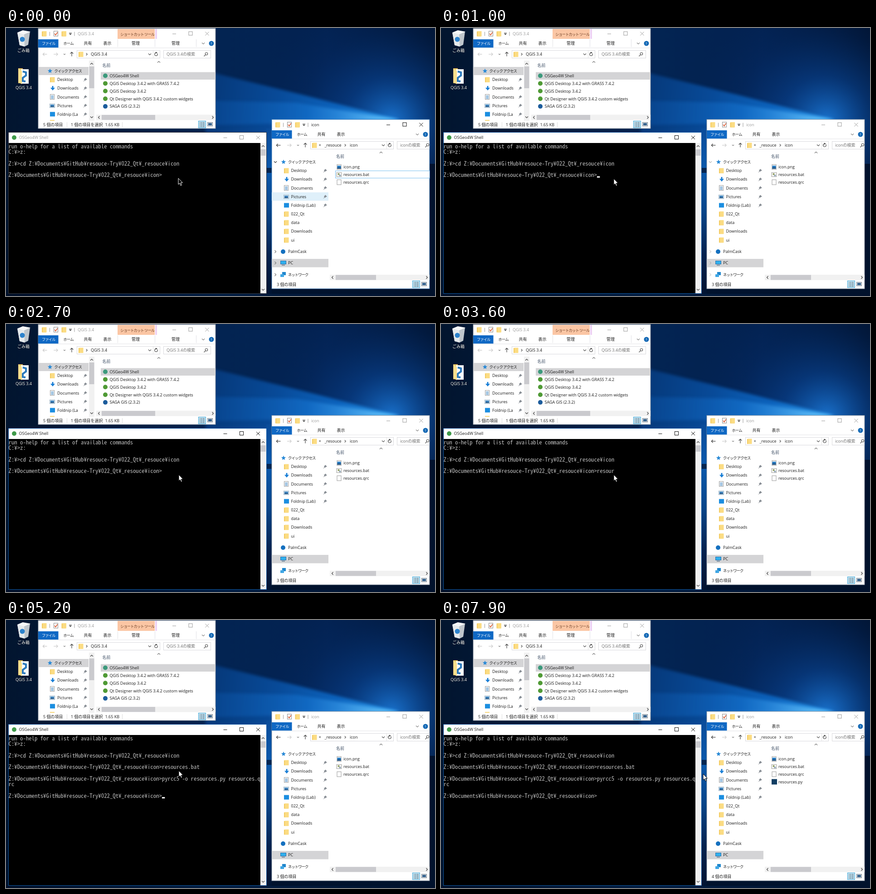
An HTML page with a canvas for the animation above (8 s loop, 946 px wide and 592 px high).

```html
<!DOCTYPE html>
<html lang="ja">
<head>
<meta charset="utf-8">
<title>Shell and folders</title>
<style>
html, body { margin: 0; width: 100%; height: 100%; overflow: hidden; background: #021330; }
canvas { display: block; }
</style>
</head>
<body>
<canvas id="stage" width="946" height="592"></canvas>
<script>
const W = 946, H = 592, LOOP = 8000;
const ctx = document.getElementById('stage').getContext('2d');
const UI = '"Open Sans", "Noto Sans CJK JP", "Noto Sans CJK", sans-serif';
const MONO = '"Noto Sans Mono CJK JP", "Liberation Mono", monospace';
const BLUE = '#0f68c4', GREY = '#9a9a9a', INK = '#1c1c1c', SEL = '#d4d4d6', THUMB = '#cacace';

// ---------- basic shapes ----------
function rect(x, y, w, h, fill) {
  ctx.fillStyle = fill;
  ctx.fillRect(x, y, w, h);
}
function box(x, y, w, h, color, fill) {
  if (fill) rect(x, y, w, h, fill);
  ctx.strokeStyle = color;
  ctx.lineWidth = 1;
  ctx.strokeRect(x + .5, y + .5, w - 1, h - 1);
}
function disc(x, y, r, fill) {
  ctx.fillStyle = fill;
  ctx.beginPath();
  ctx.arc(x, y, r, 0, Math.PI * 2);
  ctx.fill();
}
function trace(pts) {
  ctx.beginPath();
  for (let i = 0; i < pts.length; i += 2) ctx.lineTo(pts[i], pts[i + 1]);
}
function line(color, width, ...pts) {
  trace(pts);
  ctx.strokeStyle = color;
  ctx.lineWidth = width;
  ctx.stroke();
}
function poly(fill, ...pts) {
  trace(pts);
  ctx.closePath();
  ctx.fillStyle = fill;
  ctx.fill();
}
function addStops(g, colors) {
  colors.forEach((c, i) => g.addColorStop(i / (colors.length - 1), c));
  return g;
}
const shade = (x0, y0, x1, y1, ...colors) =>
  addStops(ctx.createLinearGradient(x0, y0, x1, y1), colors);
const glow = (x, y, r, ...colors) =>
  addStops(ctx.createRadialGradient(x, y, 0, x, y, r), colors);

// ---------- text, y is the middle of the line ----------
function text(s, x, y, color = INK, size = 9, space = 0) {
  ctx.font = size + 'px ' + UI;
  ctx.letterSpacing = space + 'px';
  ctx.fillStyle = color;
  ctx.fillText(s, x, y + 3.3);
  ctx.letterSpacing = '0px';
}
const kana = (s, x, y, color) => text(s, x, y, color, 8.3, -.9);

// ---------- icons, x and y are the centre ----------
function folder(x, y) {
  rect(x - 5, y - 5, 9, 11, '#f3cb62');
  rect(x - 3, y - 5.5, 8.5, 11.5, '#fbdc83');
}
function checkDoc(x, y) {
  box(x - 5, y - 6, 10, 12, '#8a8a8a', '#fff');
  line('#d9542b', 1.5, x - 3, y, x - .5, y + 3, x + 3.5, y - 3);
}
function down(x, y) {
  rect(x - .5, y - 5, 3, 5, '#1a7fd6');
  poly('#1a7fd6', x - 4, y - 1, x + 6, y - 1, x + 1, y + 5);
}
function paper(x, y) {
  box(x - 5, y - 6, 10, 12, '#9a9a9a', '#fff');
}
function sheet(x, y) {
  paper(x, y);
  for (let i = -3; i < 5; i += 2) rect(x - 3, y + i, 6, 1, '#4d8fc6');
}
function picture(x, y) {
  box(x - 6, y - 4, 12, 9, '#8fa9bd', '#e9f4fb');
  rect(x - 4, y - 2, 8, 5, '#3b84c0');
  rect(x - 4, y + 1, 8, 2, '#1d4d7c');
}
function picturePage(x, y) {
  paper(x, y);
  rect(x - 4, y - 3, 8, 7, '#2c7fc4');
  rect(x - 4, y + 1, 8, 3, '#1c4f80');
}
function star(x, y) {
  const pts = [];
  for (let i = 0; i < 10; i++) {
    const a = i * Math.PI / 5 - Math.PI / 2, r = i % 2 ? 2.4 : 5.4;
    pts.push(x + r * Math.cos(a), y + r * Math.sin(a));
  }
  poly('#2a8ad6', ...pts);
}
function pin(x, y) {
  poly('#858b92', x, y - 4, x + 4, y, x + 1, y + 1, x - 1, y + 3, x - 3, y - 1, x - 1, y - 2);
  line('#858b92', 1, x - 4, y + 4, x - 1, y + 1);
}
function monitor(x, y) {
  rect(x - 6, y - 5, 13, 8, '#2f6fa8');
  rect(x - 5, y - 4, 11, 6, '#2fb0ee');
  rect(x - 3, y + 4, 7, 1.5, '#56748e');
}
function network(x, y) {
  rect(x - 2, y - 6, 8, 7, '#1f86cd');
  rect(x - 6, y - 1, 8, 6, '#3fa6e4');
}
function gears(x, y) {
  box(x - 6, y - 5, 12, 10, '#a0a0a0', '#f7f7f4');
  disc(x - 1, y - 1, 2, '#8c9a5a');
  disc(x + 2, y + 2, 2, '#8da3b5');
}
const greenDot = (x, y) => disc(x, y, 5, '#4f9a35');
const blueDot = (x, y) => disc(x, y, 5, '#1c5c9c');
const tealDot = (x, y) => disc(x, y, 5, '#3c9a7c');
const cyanBox = (x, y) => rect(x - 5, y - 5, 11, 10, '#1b8ee0');
const skyDot = (x, y) => disc(x, y, 5, '#1470bf');
const navyBox = (x, y) => rect(x - 5.5, y - 6, 12, 12, '#123e63');

// Chevron pointing along (dx, dy)
function chev(x, y, dx, dy, color = '#555', r = 3) {
  const px = -dy * r, py = dx * r, ax = dx * r / 2, ay = dy * r / 2;
  line(color, 1.1, x - ax + px, y - ay + py, x + ax, y + ay, x - ax - px, y - ay - py);
}
function arrow(x, y, dx, dy, color) {
  line(color, 1.1, x - dx * 4.5, y - dy * 4.5, x + dx * 4.5, y + dy * 4.5);
  chev(x + dx * 3, y + dy * 3, dx, dy, color, 3.4);
}
function refresh(x, y) {
  ctx.beginPath();
  ctx.arc(x, y, 3.3, -.6, 4.4);
  ctx.strokeStyle = '#444';
  ctx.lineWidth = 1.1;
  ctx.stroke();
  poly('#444', x - 1, y - 5.5, x + 3, y - 3.5, x - 1, y - 1.5);
}
function lens(x, y) {
  ctx.beginPath();
  ctx.arc(x + 1, y - 1, 2.7, 0, 7);
  ctx.strokeStyle = '#555';
  ctx.lineWidth = 1.1;
  ctx.stroke();
  line('#555', 1.3, x - 1, y + 1, x - 4.5, y + 4.5);
}
function controls(right, y, color) {
  const [a, b, c] = [right - 91, right - 55, right - 18.5];
  line(color, 1, a - 4, y + .5, a + 4, y + .5);
  ctx.strokeRect(b - 4, y - 4.5, 8, 8);
  line(color, 1, c - 4, y - 4, c + 4, y + 4);
  line(color, 1, c - 4, y + 4, c + 4, y - 4);
}
function viewIcons(x, y) {
  box(x, y, 17, 16, '#3fa5d4', '#cbe8f6');
  for (let r = 0; r < 4; r++) {
    rect(x + 3, y + 3 + r * 3, 2, 1.5, '#5d7d8e');
    rect(x + 6, y + 3 + r * 3, 3, 1.5, '#5d7d8e');
    rect(x + 10, y + 3 + r * 3, 4, 1.5, '#5d7d8e');
  }
  box(x + 20, y + 3, 12, 9, '#6e7a84', '#f4f6f8');
  rect(x + 22, y + 5, 8, 5, '#34618c');
}
function hScroll(x0, x1, y, thumb, width) {
  rect(x0, y, x1 - x0, 12, '#f1f1f1');
  rect(thumb, y + .5, width, 11, THUMB);
  chev(x0 + 6, y + 6, -1, 0, '#444');
  chev(x1 - 6, y + 6, 1, 0, '#444');
}
function vScroll(x, y0, y1, thumb, height) {
  rect(x, y0, 12, y1 - y0, '#f1f1f1');
  rect(x + .5, thumb, 11, height, THUMB);
  chev(x + 6, y0 + 7, 0, -1, '#444');
  chev(x + 6, y1 - 8, 0, 1, '#444');
}

// ---------- desktop ----------
function wallpaper() {
  rect(0, 0, W, H, shade(0, 0, W, 0, '#02152f', '#021a3c', '#032452', '#032150', '#01112c'));
  rect(0, 230, W, 362, shade(0, 230, 0, 592, 'rgba(1,18,44,0)', '#01122c'));
  rect(460, 0, 486, 300, glow(850, 205, 300, 'rgba(30,130,230,.85)', 'rgba(12,85,180,.45)', 'rgba(6,55,125,.2)', 'rgba(4,40,95,0)'));
  ctx.filter = 'blur(3px)';
  poly(shade(865, 198, 462, 150, '#2f9ff2', '#0c63bd', '#084a98', '#063a7c'),
    868, 203, 660, 149, 440, 95, 440, 240, 600, 240);
  poly(shade(865, 198, 462, 190, 'rgba(120,210,255,.9)', 'rgba(25,125,220,.45)', 'rgba(14,95,185,.3)'),
    868, 203, 640, 165, 440, 160, 440, 215, 640, 210);
  ctx.filter = 'none';
  rect(574, 222, 12, 370, shade(0, 222, 0, 592, '#0a4c9a', '#0b59ac', '#084488', '#04224f', '#011330'));
  rect(574, 309, 12, 11, '#04254f');
  rect(0, 587, W, 5, shade(0, 0, W, 0, '#010f28', '#021d42', '#01112c'));
}
function label(s, x, y) {
  ctx.textAlign = 'center';
  ctx.shadowColor = '#000';
  ctx.shadowBlur = 2;
  text(s, x, y, '#fff');
  ctx.shadowBlur = 0;
  ctx.textAlign = 'left';
}
function desktopIcons() {
  poly('#bfc6cc', 25, 10, 53, 8, 49, 37, 41, 41, 30, 38);
  poly('#e6eaec', 25, 10, 40, 13, 41, 41, 30, 38);
  poly('#f6f8f9', 25, 10, 37, 5, 54, 8, 40, 14);
  disc(36, 25, 5.5, '#2c82cc');
  label('ごみ箱', 38.5, 50);
  rect(27, 89, 10, 33, '#f0c75c');
  rect(33, 91, 17, 32, '#f8fafb');
  line('#2b79bd', 4, 37, 96, 44, 98, 44, 105, 37, 110, 37, 117, 43, 118);
  poly('#fbdf8c', 27, 89, 35, 95, 35, 124, 27, 120);
  label('QGIS 3.4', 39, 132);
}

// ---------- folder windows ----------
function frame(x, y, w, h, title, active) {
  rect(x, y, w, h, '#fff');
  box(x - .5, y - .5, w + 1, h + 1, active ? '#3c78b4' : '#8a93a0');
  const m = y + 11.5;
  folder(x + 13, m);
  checkDoc(x + 39, m);
  folder(x + 56.5, m);
  rect(x + 25, m - 4, 1, 9, '#999');
  rect(x + 79.5, m - 4, 1, 9, '#999');
  poly('#444', x + 68, m, x + 74, m, x + 71, m + 3);
  rect(x + 68, m - 2, 6, 1, '#444');
  text(title, x + 87, m, active ? INK : GREY);
  controls(x + w, m, active ? '#111' : GREY);

  const tab = y + 33;
  rect(x, y + 24, 44.5, 18.5, BLUE);
  kana('ファイル', x + 8, tab, '#fff');
  kana('ホーム', x + 55.5, tab);
  text('共有', x + 100.5, tab);
  text('表示', x + 143.5, tab);
  rect(x, y + 42.5, w, 1, '#e2e2e6');
  chev(x + w - 27, tab, 0, 1, '#888');
  disc(x + w - 9, tab, 5.5, '#1268b5');
  text('?', x + w - 11, tab, '#fff', 8);
}
function addressBar(x, y, backOn) {
  arrow(x + 15, y, -1, 0, backOn ? '#333' : '#c4c4c4');
  arrow(x + 38.5, y, 1, 0, '#c8c8c8');
  chev(x + 58, y, 0, 1, '#888', 2);
  arrow(x + 74, y, 0, -1, '#333');
  box(x + 85, y - 9, 184, 18, '#d9d9dd', '#fff');
  folder(x + 94, y);
  chev(x + 246, y, 0, 1);
  rect(x + 253, y - 8, 1, 16, '#e2e2e2');
  refresh(x + 260, y);
}
function rows(list, x, textX, y, step) {
  list.forEach(([icon, s], i) => {
    icon(x, y + i * step);
    text(s, textX, y + i * step);
  });
}
const PLACES = [[folder, 'Desktop'], [down, 'Downloads'], [sheet, 'Documents'], [picture, 'Pictures']];

function programsWindow() {
  frame(71, 1, 391, 221, 'QGIS 3.4', false);
  rect(246, 2, 82, 22, '#fbc6a4');
  rect(329, 2, 4, 22, '#eed2f4');
  kana('ショートカット ツール', 252, 14, '#6b3d24');
  for (const x of [246, 328, 419]) rect(x, 25, 1, 17, '#e2e2e6');
  text('管理', 277, 34);
  text('管理', 365, 34);
  addressBar(71, 58, false);
  chev(178, 58, 1, 0, '#555', 2.5);
  text('QGIS 3.4', 187, 58);
  box(347, 49, 105, 18, '#d9d9dd', '#fff');
  text('QGIS 3.4の検索', 354, 58, '#707070');
  lens(441, 58);

  rect(71, 86, 111, 18, SEL);
  star(97, 95);
  kana('クイック アクセス', 106.5, 95);
  rows([...PLACES, [cyanBox, 'Foldnip (La']], 102, 113, 114, 19.1);
  for (let i = 0; i < 5; i++) pin(175, 114 + i * 19.1);
  rect(97, 203, 10, 2, '#f7d77c');
  vScroll(183, 72, 205, 85, 48);

  text('名前', 212.5, 83, '#44546a');
  chev(337, 75, 0, -1, '#777');
  rect(209, 97.5, 253, 16.5, SEL);
  rows([[tealDot, 'OSGeo4W Shell'], [greenDot, 'QGIS Desktop 3.4.2 with GRASS 7.4.2'],
    [greenDot, 'QGIS Desktop 3.4.2'], [greenDot, 'Qt Designer with QGIS 3.4.2 custom widgets'],
    [blueDot, 'SAGA GIS (2.3.2)']], 219, 228.5, 105.5, 16.9);
  hScroll(199, 462, 191.5, 211, 118);
  text('5 個の項目', 82, 213.5);
  rect(134, 208, 1, 11, '#ddd');
  text('1 個の項目を選択', 143, 213.5);
  text('1.65 KB', 218.5, 213.5);
  rect(256, 208, 1, 11, '#ddd');
  viewIcons(424, 205);
}

function filesWindow(active, hasPy, fade) {
  frame(586, 202, 348, 374, 'icon', active);
  addressBar(586, 259, true);
  text('«', 690, 258);
  text('_resouce', 702.5, 259);
  chev(748, 259, 1, 0, '#555', 2.5);
  text('icon', 758, 259);
  box(862, 250, 72, 18, '#d9d9dd', '#fff');
  text('iconの検索', 869, 259, '#707070');
  lens(929, 259);

  if (active) rect(586, 363, 125, 18.5, '#dff0fa');
  rect(586, 510, 125, 18.5, SEL);
  star(612, 296);
  kana('クイック アクセス', 622, 296);
  rows([...PLACES, [cyanBox, 'Foldnip (Lab)'], [folder, '022_Qt'], [folder, 'data'],
    [folder, 'Downloads'], [folder, 'ui']], 618, 628.5, 315, 19.15);
  for (let i = 0; i < 5; i++) pin(704, 315 + i * 19.15);
  skyDot(611, 494);
  text('PalmCask', 622, 494);
  monitor(611, 519);
  text('PC', 622, 519);
  network(611, 545);
  kana('ネットワーク', 622, 545);
  ctx.globalAlpha = fade;
  chev(594, 296, 0, 1, '#333');
  for (const y of [494, 519, 545]) chev(594, y, 1, 0, '#777');
  ctx.globalAlpha = 1;

  text('名前', 728, 284, '#44546a');
  chev(827, 275, 0, -1, '#777');
  if (active) {
    box(726, 315, 209, 17, '#7cc0ee', '#fff');
    rect(934, 314, 1, 19, '#3c78b4');
  }
  const files = [[picturePage, 'icon.png'], [gears, 'resources.bat'], [paper, 'resources.qrc']];
  if (hasPy) files.push([navyBox, 'resources.py']);
  rows(files, 734.5, 744, 307, 16.8);
  hScroll(714, 934, 545, 727, 89);
  text((hasPy ? 4 : 3) + ' 個の項目', 597, 567);
  viewIcons(896, 558);
}

// ---------- shell ----------
const CELL = 6.385, ROW = 12.73;
const PROMPT = 'Z:¥Documents¥GitHub¥resouce-Try¥022_Qt¥_resouce¥icon>';
const COMMAND = 'resources.bat';
const T = { focus: 500, type: 2900, key: 110, enter: 4700, done: 5000, file: 5600, move: 7350, stop: 7850 };

// Font size at which one character fills one cell
ctx.font = '100px ' + MONO;
const monoSize = CELL * 100 / ctx.measureText('0').width;

function shellLines(t) {
  const typed = Math.max(0, Math.min(COMMAND.length, Math.floor((t - T.type) / T.key)));
  const out = ['run o-help for a list of available commands', 'C:¥>z:', '',
    'Z:¥>cd Z:¥Documents¥GitHub¥resouce-Try¥022_Qt¥_resouce¥icon', '', PROMPT + COMMAND.slice(0, typed)];
  if (t >= T.enter) out.push('', PROMPT + 'pyrcc5 -o resources.py resources.q', 'rc');
  if (t >= T.done) out.push('', PROMPT);
  return out;
}
function shell(t) {
  const active = t >= T.focus;
  rect(5, 230, 570, 357, active ? '#0f5aa6' : '#33373d');
  rect(6, 231, 568, 23, '#fff');
  disc(18, 242, 5, '#3f9a4a');
  text('OSGeo4W Shell', 28.5, 242, active ? INK : GREY);
  controls(574.5, 242, active ? '#111' : GREY);
  rect(6, 254, 555, 332, '#000');
  vScroll(561, 254, 586, 268, 14);
  rect(573, 254, 1, 332, '#f1f1f1');

  const lines = shellLines(t);
  ctx.font = monoSize + 'px ' + MONO;
  ctx.fillStyle = '#bdbdbd';
  lines.forEach((s, i) => ctx.fillText(s, 5.5, 265.6 + i * ROW));
  const blinkOn = (t - 900 + 1060) % 1060 < 530;
  if (active && blinkOn) {
    const last = lines.length - 1;
    rect(5.5 + lines[last].length * CELL, 327.5 + (last - 5) * ROW, 6.4, 3, '#fff');
  }
}

// ---------- mouse ----------
function pointer(t) {
  const active = t >= T.focus;
  const k = Math.max(0, Math.min(1, (t - T.move) / (T.stop - T.move)));
  const e = k * k * (3 - 2 * k);
  ctx.save();
  ctx.translate((active ? 381 : 380) + 197 * e, (active ? 333 : 332) + 7 * e);
  trace([0, 0, 0, 13.5, 3, 10.8, 5.2, 16, 7.4, 15, 5.2, 10, 9.3, 9.7]);
  ctx.closePath();
  ctx.fillStyle = active ? '#fff' : '#000';
  ctx.strokeStyle = active ? '#000' : '#fff';
  ctx.lineWidth = 1;
  ctx.fill();
  ctx.stroke();
  ctx.restore();
}

function draw(now) {
  const t = now % LOOP;
  wallpaper();
  desktopIcons();
  programsWindow();
  const fade = Math.max(0, Math.min(1, 1 - (t - T.focus) / 800));
  filesWindow(t < T.focus, t >= T.file, fade);
  shell(t);
  pointer(t);
}

const start = performance.now();
function tick() {
  draw(performance.now() - start);
  requestAnimationFrame(tick);
}
tick();
</script>
</body>
</html>
```
